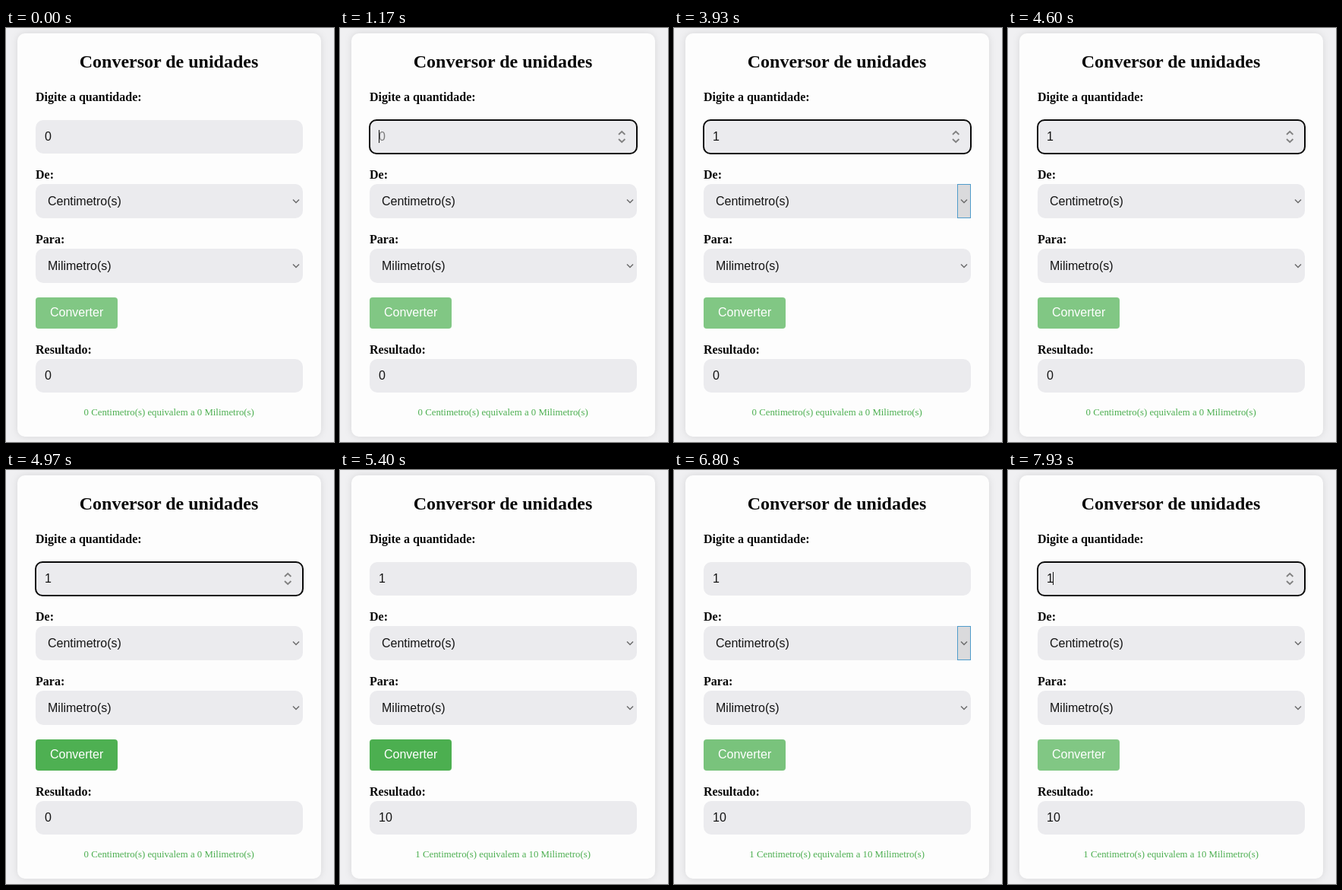
An HTML page that plays this animation: 432x544 px, repeating every 8 s.

```html
<!DOCTYPE html>
<html lang="pt-BR">
<head>
<meta charset="utf-8">
<title>Conversor de unidades</title>
<style>
  html, body { margin: 0; width: 100%; height: 100%; overflow: hidden; background: #f0f0f2; }
  svg { display: block; width: 432px; height: 544px; }
  text { font: 16px "Liberation Sans", Arial, sans-serif; fill: #141414; white-space: pre; }
  .title, .label, .summary { font-family: "Liberation Serif", "Times New Roman", serif; }
  .title, .label { font-weight: bold; fill: #080808; }
  .title { font-size: 24px; text-anchor: middle; }
  .summary { font-size: 12.8px; text-anchor: middle; fill: #4caf50; }
  .card { fill: #fdfdfd; filter: drop-shadow(0 0 5px rgba(0, 0, 0, .1)); }
  .field { fill: #ebebee; }
  .chevron { fill: none; stroke: #6c6c6c; stroke-width: 1.5; }
  .spinner { fill: none; stroke: #808080; stroke-width: 1.8; }
  .hover { fill: #dadadc; stroke: #4f9ccb; }
  .outline { fill: none; stroke: #0a0a0a; stroke-width: 2; }
  .placeholder { fill: #7c7c7c; }
  .caret { fill: #111; }
  .caption { fill: #fff; }

  .timed { animation: 8s step-end infinite; }
  .focus { animation-name: focus; }
  .spinner { animation-name: spinner; }
  .start { animation-name: start; }
  .placeholder { animation-name: placeholder; }
  .typed { animation-name: typed; }
  .caret-empty { animation-name: caret-empty; }
  .caret-typed { animation-name: caret-typed; }
  .before { animation-name: before; }
  .after { animation-name: after; }
  .hover-from { animation-name: hover-from; }
  .hover-to { animation-name: hover-to; }
  .button { animation: button 8s ease infinite; }

  /* 1% is 80 ms */
  @keyframes focus {
    0%, 66.6% { opacity: 0 }
    14.6%, 97.8%, 100% { opacity: 1 }
  }
  @keyframes spinner {
    0%, 66.6% { opacity: 0 }
    9.1%, 92.4%, 100% { opacity: 1 }
  }
  @keyframes start { 0% { opacity: 1 } 14.6%, 100% { opacity: 0 } }
  @keyframes placeholder { 0%, 37.8%, 100% { opacity: 0 } 14.6% { opacity: 1 } }
  @keyframes typed { 0% { opacity: 0 } 37.8%, 100% { opacity: 1 } }
  @keyframes caret-empty {
    0%, 20.8%, 34.1%, 100% { opacity: 0 }
    14.6%, 27.4% { opacity: 1 }
  }
  @keyframes caret-typed {
    0%, 44.6%, 57.4%, 66.6% { opacity: 0 }
    37.8%, 51.2%, 63.8%, 97.8%, 100% { opacity: 1 }
  }
  @keyframes before { 0% { opacity: 1 } 67%, 100% { opacity: 0 } }
  @keyframes after { 0% { opacity: 0 } 67%, 100% { opacity: 1 } }
  @keyframes hover-from {
    0%, 7.8%, 51.2%, 91.6%, 100% { opacity: 0 }
    5%, 48.7%, 84.2% { opacity: 1 }
  }
  @keyframes hover-to {
    0%, 4.6%, 54.9%, 84%, 100% { opacity: 0 }
    3.7%, 53.7%, 81.5% { opacity: 1 }
  }
  @keyframes button {
    0%, 57.5%, 87.8%, 100% { fill: #81c784 }
    63.75%, 81.6% { fill: #4caf50 }
  }
</style>
</head>
<body>
<svg viewBox="0 0 432 544">
  <rect class="card" x="15" y="7" width="400" height="530" rx="10"/>
  <text class="title" x="214.5" y="52">Conversor de unidades</text>

  <text class="label" x="39" y="96">Digite a quantidade:</text>
  <rect class="field" x="39" y="121" width="352" height="44" rx="10"/>
  <rect class="outline timed focus" x="39" y="121" width="352" height="44" rx="9"/>
  <text class="timed start" x="51" y="148">0</text>
  <text class="placeholder timed" x="51" y="148">0</text>
  <text class="timed typed" x="51" y="148">1</text>
  <rect class="caret timed caret-empty" x="51" y="134" width="1" height="17"/>
  <rect class="caret timed caret-typed" x="59" y="134" width="1" height="17"/>
  <path class="spinner timed" d="M367 140l4.2-4 4.2 4M367 146l4.2 4 4.2-4"/>

  <text class="label" x="39" y="198">De:</text>
  <rect class="field" x="39" y="205" width="352" height="45" rx="10"/>
  <rect class="hover timed hover-from" x="373.5" y="205.5" width="17" height="44"/>
  <text x="55" y="233">Centimetro(s)</text>
  <path class="chevron" d="M378 225.5l4 4 4-4"/>

  <text class="label" x="39" y="283">Para:</text>
  <rect class="field" x="39" y="290" width="352" height="45" rx="10"/>
  <rect class="hover timed hover-to" x="373.5" y="290.5" width="17" height="44"/>
  <text x="55" y="318">Milimetro(s)</text>
  <path class="chevron" d="M378 310.5l4 4 4-4"/>

  <rect class="button" x="39" y="354" width="108" height="41" rx="4"/>
  <text class="caption" x="58" y="379">Converter</text>

  <text class="label" x="39" y="428">Resultado:</text>
  <rect class="field" x="39" y="435" width="352" height="44" rx="10"/>
  <g class="timed before">
    <text x="51" y="462">0</text>
    <text class="summary" x="214.7" y="509">0 Centimetro(s) equivalem a 0 Milimetro(s)</text>
  </g>
  <g class="timed after">
    <text x="51" y="462">10</text>
    <text class="summary" x="214.7" y="509">1 Centimetro(s) equivalem a 10 Milimetro(s)</text>
  </g>
</svg>
</body>
</html>
```
